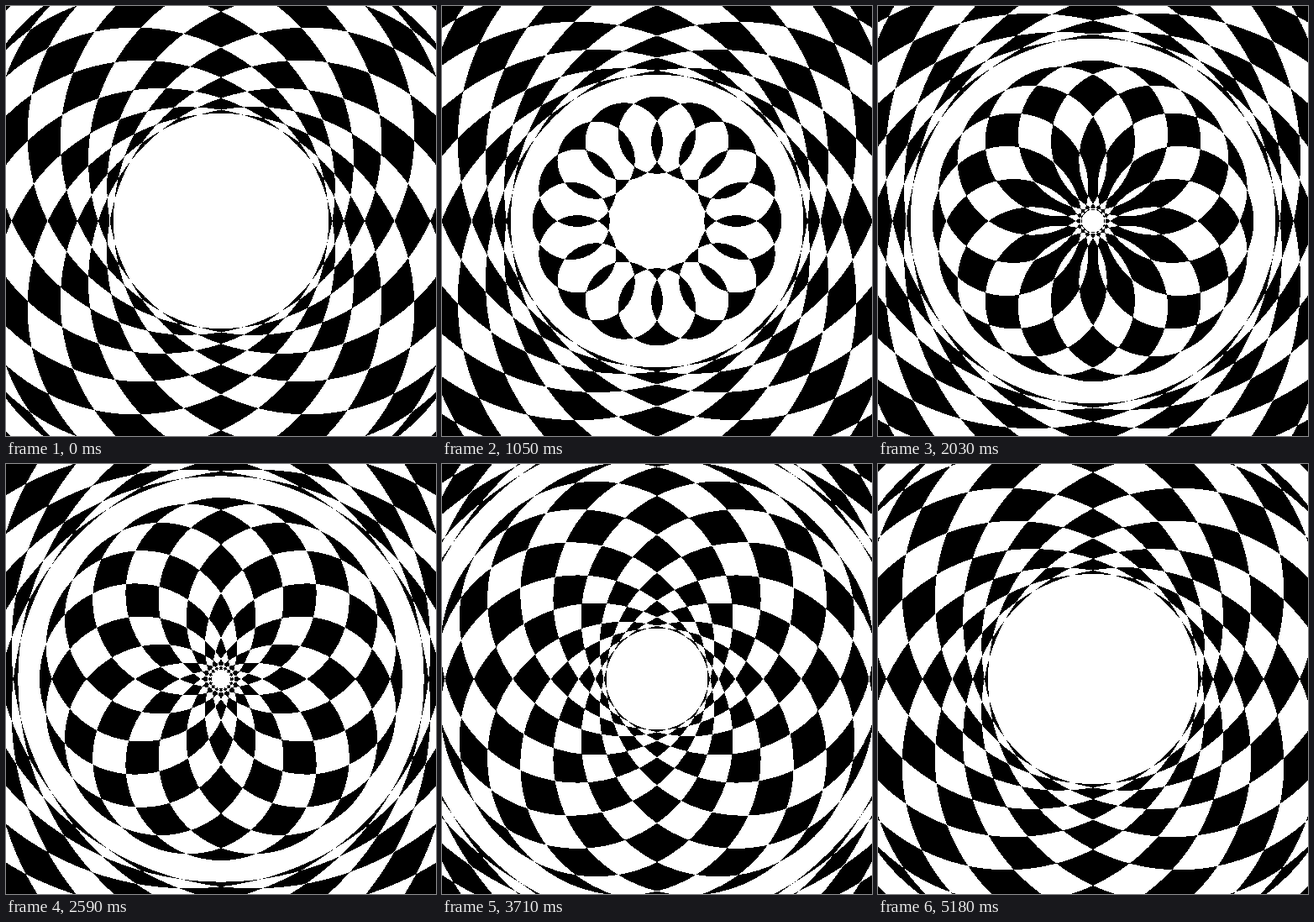
Animation of 512x512 px, one loop 5.25 s. Source, as an HTML page:

```html
<!DOCTYPE html>
<html>
<head>
<meta charset="utf-8">
<style>
  html, body { margin: 0; width: 100%; height: 100%; overflow: hidden; background: #fff; }
  svg { display: block; width: 100vw; height: 100vh; }
</style>
</head>
<body>
<svg viewBox="-256 -256 512 512">
  <path id="rings" fill="#000" fill-rule="evenodd" shape-rendering="crispEdges"/>
</svg>
<script>
const STEP = 70, STEPS = 75;
const COUNT = 16, ORBIT = 102.4, GROWTH = 3.072;
const rings = document.getElementById('rings');

function circle(x, y, r) {
  return `M${x - r} ${y}a${r} ${r} 0 1 1 ${2 * r} 0a${r} ${r} 0 1 1 ${-2 * r} 0z`;
}

// Sixteen equal circles spaced around the centre
function wreath(r) {
  let d = '';
  for (let i = 0; i < COUNT; i++) {
    const a = i * 2 * Math.PI / COUNT;
    d += circle(ORBIT * Math.cos(a), ORBIT * Math.sin(a), r);
  }
  return d;
}

function draw() {
  const step = Math.floor(performance.now() / STEP) % STEPS;
  let d = '';
  // A new wreath starts each loop; older ones keep growing off the stage
  for (let age = 0; age < 3; age++) {
    const r = (step + age * STEPS) * GROWTH;
    if (r > 0) d += wreath(r);
  }
  rings.setAttribute('d', d);
  requestAnimationFrame(draw);
}
draw();
</script>
</body>
</html>
```
